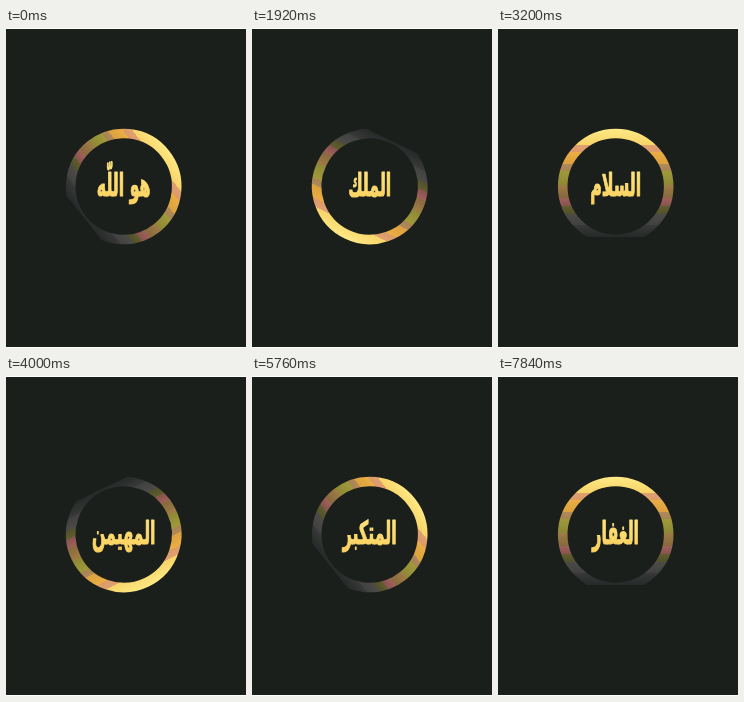
Recreate the animation shown at these times as an HTML page. Size 240 by 320 pixels, loop 8 s.

```html
<!DOCTYPE html>
<html lang="ar">
<head>
<meta charset="utf-8">
<style>
  html, body { margin: 0; width: 100%; height: 100%; overflow: hidden; background: #1b1f1c; }
  svg { display: block; width: 100%; height: 100%; }
  text {
    font: bold 31px "DejaVu Sans", sans-serif;
    text-anchor: middle;
    fill: url(#gold);
    stroke: url(#gold);
    stroke-width: 1.2;
    stroke-linejoin: round;
  }
</style>
</head>
<body>
<svg viewBox="0 0 240 320">
  <defs>
    <linearGradient id="gold" x1="0" y1="0" x2="0" y2="1">
      <stop offset="0" stop-color="#ffe684"/>
      <stop offset="1" stop-color="#fad05c"/>
    </linearGradient>
    <linearGradient id="metal" gradientUnits="userSpaceOnUse" x1="0" y1="-58" x2="0" y2="50"></linearGradient>
    <clipPath id="cut"><rect x="-60" y="-60" width="120" height="110.5"/></clipPath>
  </defs>
  <path d="M0 .5H240M0 319.5H240" stroke="#fff"/>
  <g transform="translate(117.7 158.5)">
    <g id="ring" clip-path="url(#cut)">
      <circle r="53" fill="none" stroke="url(#metal)" stroke-width="9.6"/>
    </g>
    <g id="label" transform="scale(.51 1.04)"></g>
  </g>
</svg>
<script>
const LOOP = 8000, TICK = 160, POSES = 7;
const POSES_PER_TICK = 2.165, FIRST_POSE = 6.01;

const words = [
  'هو اللّه', 'الذي لا إله|إلا هو', 'الرحمن', 'الرحيم', 'الملك', 'القدوس',
  'السلام', 'المؤمن', 'المهيمن', 'العزيز', 'الجبار', 'المتكبر',
  'الخالق', 'البارئ', 'المصور', 'الغفار'
];

// Bands down the ring: end position, first colour, last colour
const bands = [
  [.15, '#ffe985', '#f6d468'], [.22, '#e0a070', '#dc9a68'],
  [.33, '#eaae44', '#dca03e'], [.39, '#b08a58', '#a88452'],
  [.52, '#a09a3a', '#8e8836'], [.64, '#a07c46', '#87693e'],
  [.72, '#a0625a', '#86524e'], [.79, '#605e2e', '#50502c'],
  [.89, '#4c4b47', '#404142'], [1, '#383938', '#272a2a']
];

const svg = 'http://www.w3.org/2000/svg';
const byId = id => document.getElementById(id);
function add(parent, tag, attributes) {
  const node = parent.appendChild(document.createElementNS(svg, tag));
  for (const key in attributes) node.setAttribute(key, attributes[key]);
  return node;
}

let start = 0;
for (const [end, from, to] of bands) {
  add(byId('metal'), 'stop', { offset: start, 'stop-color': from });
  add(byId('metal'), 'stop', { offset: end, 'stop-color': to });
  start = end;
}

let shown = -1;
function showWord(index) {
  if (index === shown) return;
  shown = index;
  const label = byId('label');
  label.replaceChildren();
  const lines = words[index].split('|');
  lines.forEach((line, i) => {
    const y = 9 + (i - (lines.length - 1) / 2) * 27;
    add(label, 'text', { y, direction: 'rtl' }).textContent = line;
  });
}

function draw(now) {
  const tick = Math.floor(now % LOOP / TICK);
  const pose = Math.floor(tick * POSES_PER_TICK + FIRST_POSE);
  byId('ring').setAttribute('transform', `rotate(${-360 / POSES * (pose % POSES)})`);
  showWord(Math.floor((pose + 5) / POSES) - 1);
}

function frame() {
  draw(performance.now());
  requestAnimationFrame(frame);
}
frame();
</script>
</body>
</html>
```
